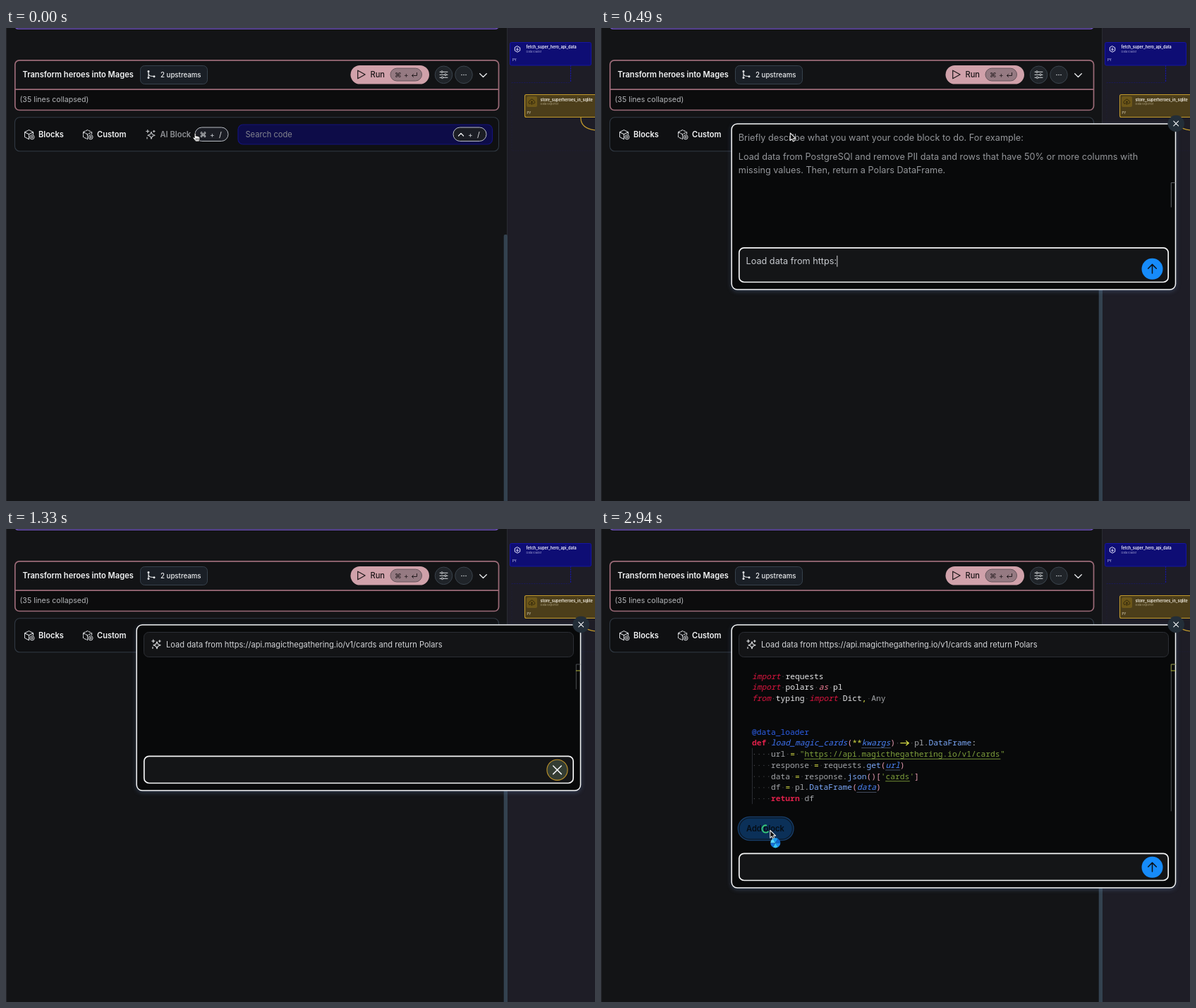
Write an HTML page with a canvas that moves like this. It is 835x671 px and loops after 3.01 s.

```html
<!DOCTYPE html>
<html lang="en">
<head>
<meta charset="utf-8">
<title>AI block</title>
<style>
html, body { margin: 0; width: 100%; height: 100%; overflow: hidden; background: #131416; }
canvas { display: block; }
</style>
</head>
<body>
<canvas id="stage" width="835" height="671"></canvas>
<script>
const ctx = document.getElementById('stage').getContext('2d');
const LOOP = 3010, STEP = 70;
const SANS = 'Inter, "Open Sans", sans-serif';
const SYMBOL = '"DejaVu Sans", sans-serif';
const MONO = '"Noto Sans Mono", "DejaVu Sans Mono", monospace';
const PROMPT = 'Load data from https://api.magicthegathering.io/v1/cards and return Polars';

// Braces mark a styled token; the first letter selects the style.
const CODE = [
  '{kimport} {wrequests}',
  '{kimport} {wpolars} {aas} {wpl}',
  '{kfrom} {wtyping} {kimport} {wDict}{o,} Any',
  '',
  '',
  '{d@data_loader}',
  '{bdef} {fload_magic_cards}{p(}{o**}{ukwargs}{p)} {o->} pl.{cDataFrame}{w:}',
  '    url {o=} {q"}{shttps://api.magicthegathering.io/v1/cards}{q"}',
  '    response {o=} requests.{cget}{p(}{uurl}{p)}',
  '    data {o=} response.{cjson}{p()[}{q\'}{scards}{q\'}{p]}',
  '    df {o=} pl.{cDataFrame}{p(}{udata}{p)}',
  '    {breturn} df'
];
const STYLE = {
  k: ['italic ', '#d8153f'], b: ['bold ', '#e0204a'], a: ['italic ', '#ee7d95'],
  w: ['', '#e6e6e8'], f: ['italic ', '#3f74f5'], u: ['italic ', '#4a82f5'],
  d: ['', '#2c5ee8'], c: ['', '#7ba7f7'], p: ['', '#e59bb0'],
  o: ['', '#d5dc45'], q: ['', '#7fa03c'], s: ['', '#7fa03c'], x: ['', '#a3a5a9']
};
const CHARS = CODE.join('').replace(/\{\w|\}/g, '').length;

const clamp = v => Math.max(0, Math.min(1, v));

function text(s, x, cy, size, color, weight = 400, family = SANS) {
  ctx.font = `${weight} ${size}px ${family}`;
  ctx.fillStyle = color;
  ctx.fillText(s, x, cy + size * 0.364);
}

function paint(fill, stroke, width) {
  if (fill) { ctx.fillStyle = fill; ctx.fill(); }
  if (stroke) { ctx.strokeStyle = stroke; ctx.lineWidth = width; ctx.stroke(); }
}

function box(x, y, x2, y2, r, fill, stroke, width = 1) {
  ctx.beginPath();
  ctx.roundRect(x, y, x2 - x, y2 - y, r);
  paint(fill, stroke, width);
}

function disc(x, y, r, fill, stroke, width = 1) {
  ctx.beginPath();
  ctx.arc(x, y, r, 0, Math.PI * 2);
  paint(fill, stroke, width);
}

function path(d, x, y, stroke, width = 1, fill) {
  ctx.save();
  ctx.translate(x, y);
  ctx.lineJoin = ctx.lineCap = 'round';
  const p = new Path2D(d);
  if (fill) { ctx.fillStyle = fill; ctx.fill(p); }
  if (stroke) { ctx.strokeStyle = stroke; ctx.lineWidth = width; ctx.stroke(p); }
  ctx.restore();
}

function cross(x, y, r, width) {
  path(`M${-r} ${-r}L${r} ${r}M${r} ${-r}L${-r} ${r}`, x, y, '#f2f4f6', width);
}

function sparkle(x, y, color) {
  path('M1 -3.6L2.3 -.3 6 1.3 2.3 2.8 1 6.2 -.4 2.8 -4 1.3 -.4 -.3Z' +
       'M-4.2 -6.5V-2.5M-6.2 -4.5H-2.2M4.8 -5.8V-3.2M3.5 -4.5H6.1M-5 4V6', x, y, color, 1.15);
}

function cube(x, y, dashed) {
  ctx.setLineDash(dashed ? [3, 1.4] : []);
  path('M-6.5 -3.3L-.5 -6.4 5.6 -3.3V0M-6.5 -3.3V3.6L-.5 6.7M-6.5 -3.3L-.5 -.2 5.6 -3.3M-.5 -.2V6.7', x, y, '#d6d8db', 1.05);
  ctx.setLineDash([]);
  disc(x + 4, y + 3.8, 3.1, '#101113', '#d6d8db', 1);
  path('M-1.5 0H1.5M0 -1.5V1.5', x + 4, y + 3.8, '#d6d8db', 0.9);
}

function keycap(x, glyph) {
  box(x, 141, x + 47, 160.5, 9.7, '#1b1d24', '#b9bdc4', 1);
  if (glyph) text(glyph, x + 6.5, 151, 10, '#e8eaec', 400, SYMBOL);
  else path('M-3.5 2L0 -1.6 3.5 2', x + 11, 151, '#f0f1f3', 1.3);
  text('+', x + 21, 151, 10, '#cfd2d6');
  text('/', x + 34, 151, 10.5, '#e8eaec');
}

function graph() {
  ctx.fillStyle = '#1e1d26';
  ctx.fillRect(711, 0, 124, 671);
  ctx.fillStyle = '#2a2b32';
  ctx.fillRect(710, 0, 1, 671);
  ctx.setLineDash([1.5, 2]);
  path('M717 77.5H800', 0, 0, '#18186a', 0.7);
  path('M717 77.5V174H835', 0, 0, '#20203a', 0.6);
  path('M800.5 53V77', 0, 0, '#1717a8', 1.2);
  ctx.setLineDash([]);

  box(714.5, 20.5, 829.5, 53, 2, '#0e0d74', '#1514a2', 1);
  path('M0 -4.2L3.7 -2.1V2.1L0 4.2 -3.7 2.1V-2.1ZM0 -1.8V1.5M-1.5 .2L0 1.7 1.5 .2', 725, 30, '#e8e8ff', 1);
  text('fetch_super_hero_api_data', 737.5, 27.3, 5.5, '#f2f2ff', 600);
  text('Data loader', 737.5, 33.6, 4, '#9a9ad0');
  text('PY', 718, 45, 4.2, '#c8c8f0', 500);

  path('M815 126C814 138 823 143.5 836 145', 0, 0, '#c29a2c', 1.2);
  box(735.5, 94.5, 845, 126.5, 2, '#4c3e1a', '#c29a2c', 1.1);
  box(738, 97, 753, 112, 2, '#6d5719');
  path('M-1.5 2.8H-3.8C-5.4 .8 -4 -1.4 -2.6 -1.4C-1.6 -4.4 2.2 -3.6 2.4 -1.4C4.8 -1.2 4.6 2.6 2.8 2.8H1.5M0 4V-.4M-1.5 1L0 -.6 1.5 1', 745.5, 104.5, '#2a210b', 0.9);
  text('store_superheroes_in_sqlite', 757.5, 101.8, 5.5, '#f4efe2', 600);
  text('Data exporter', 757.5, 108, 4, '#a89c78');
  text('PY', 738.5, 120, 4.2, '#d8cfb4', 500);
}

function block() {
  box(12.5, -20, 698.5, 1.3, 5, null, '#6d52b8', 1.6);
  box(12.8, 45.8, 698.5, 116.5, 6, '#0c0c0d', null);
  box(12.8, 45.8, 698.5, 87, [6, 6, 0, 0], '#121315', null);
  path('M13 87.2H698', 0, 0, '#9c6b78', 1.7);
  box(12.8, 45.8, 698.5, 116.5, 6, null, '#9c6b78', 1.7);
  text('Transform heroes into Mages', 23.5, 66, 11.1, '#f4f5f6', 600);
  text('(35 lines collapsed)', 19.5, 101.5, 10.6, '#b4b6b9');

  box(190.5, 53.5, 285.5, 79.5, 6, '#1a1f26', '#36414c', 1);
  path('M-4 -3V3M-4 -1C-4 3 0 3 3 3', 206, 65.5, '#e4e6e8', 1.2);
  for (const [x, y] of [[202, 61.5], [202, 70.5], [210, 68.7]]) disc(x, y, 1.5, '#e4e6e8');
  text('2 upstreams', 219, 66, 9.7, '#eceef0', 500);

  box(488.5, 53, 600, 79.5, 13.2, '#d0a1aa');
  path('M-4.8 -5.8L5.6 0 -4.8 5.8Z', 503.5, 66, '#1d1719', 1.2);
  text('Run', 516.5, 66, 11.1, '#1a1416', 500);
  box(545, 57.2, 589.5, 75, 9, '#957a82', '#66545b', 1);
  text('⌘', 551, 66.5, 9.5, '#231b1e', 400, SYMBOL);
  text('+', 564, 66, 10, '#231b1e');
  path('M3.5 -2.8V1.2H-3.5M-1.5 -.8L-3.5 1.2 -1.5 3.2', 579, 66.3, '#231b1e', 1);

  for (const x of [620.5, 649]) disc(x, 66.3, 12.3, '#202429', '#3a434c', 1);
  path('M-5.5 -4H5.5M-5.5 0H5.5M-5.5 4H5.5', 620.5, 66.3, '#d8dadc', 1);
  for (const [x, y] of [[618, 62.3], [623, 66.3], [618.5, 70.3]]) disc(x, y, 1.3, '#202429', '#e4e6e8', 0.9);
  for (const x of [646, 649, 652]) disc(x, 66.5, 0.75, '#e4e6e8');
  path('M-4.8 -2.3L0 2.5 4.8 -2.3', 676.5, 67, '#eceef0', 1.3);
}

function toolbar() {
  box(12.5, 126.8, 698.5, 174.8, 7, '#0f1012', '#303943', 1.1);
  cube(33, 151, false);
  text('Blocks', 46, 151.3, 11.1, '#f2f3f4', 600);
  cube(116, 151, true);
  text('Custom', 129, 151.3, 11.1, '#f2f3f4', 600);
  sparkle(205, 151, '#c4c6c9');
  text('AI Block', 218.5, 151.3, 11.1, '#8d8f93', 600);
  keycap(268, '⌘');
  box(329, 137, 689.5, 165, 7, '#0d0c48', '#14137a', 1.2);
  text('Search code', 339.5, 151.3, 11.1, '#85868f');
  keycap(634, null);
}

function hand(x, y) {
  path('M2.1 6.6V1.2C2.1 -.3 4.2 -.3 4.2 1.2V4.3C4.8 3.7 6 3.9 6.1 4.7C6.8 4.2 7.9 4.5 8 5.3C8.9 5 9.7 5.5 9.7 6.4V8.4C9.7 10 9 10.4 8.8 12H3.6C3.2 10.2 1.2 9 .2 7.3C-.5 6 1.1 5.4 2.1 6.6Z',
    x, y, '#111', 0.9, '#fff');
  path('M4.3 7.6V10M6 7.6V10M7.7 7.6V10', x, y, '#111', 0.7);
}

function arrow(x, y) {
  path('M0 0V10.6L2.5 8.4 4.1 12 6 11.1 4.5 7.6H7.8Z', x, y, '#e6e6e6', 1.1, '#0a0a0a');
}

function waitDisc(x, y, angle) {
  const hues = ['#1d8cf0', '#35c3f5', '#1470d8', '#5ad6fa', '#1b9df2', '#0f62c8'];
  hues.forEach((c, i) => {
    const a = angle + i * Math.PI / 3;
    ctx.beginPath();
    ctx.moveTo(x, y);
    ctx.arc(x, y, 7, a, a + Math.PI / 3 + 0.02);
    paint(c);
  });
}

function code(shown) {
  const x0 = 214, pitch = 6.77, size = pitch / 0.6;
  let left = shown;
  CODE.forEach((line, row) => {
    const y = 208.6 + row * 15.76;
    let x = x0;
    for (const m of line.matchAll(/\{(\w)([^}]*)\}|[^{]+/g)) {
      if (left <= 0) return;
      const key = m[1] || 'x', s = (m[2] || m[0]).slice(0, left);
      const [face, color] = STYLE[key], w = s.length * pitch;
      left -= s.length;
      if (s === '->') {
        path('M1 0H12.4M8.8 -3L12.4 0 8.8 3', x, y + 0.5, color, 1.3);
      } else {
        text(s, x, y, size, color, face, MONO);
        [...s].forEach((ch, i) => {
          if (ch === ' ') disc(x + (i + 0.5) * pitch, y + 0.6, 0.65, '#515459');
        });
      }
      if (key === 's' || key === 'u') {
        ctx.setLineDash(key === 'u' ? [1, 1] : []);
        path(`M0 0H${w}`, x, y + 7.3, key === 'u' ? '#56627a' : color, 0.9);
        ctx.setLineDash([]);
      }
      x += w;
    }
    if (row > 6) path(`M214.5 ${y - 7.8}V${y + 7.8}`, 0, 0, '#33363b', 0.8);
  });
}

function addButton(t) {
  const busy = t >= 2380;
  const press = t >= 2100 && !busy ? 1 : 0;
  box(194.3 + press, 408.3 + press, 273 - press, 441.7 - press, 17, '#0a1a2c', busy ? '#173f6c' : '#1b4a80', 1.3);
  box(196.5, 410.5, 270.8, 439.5, 14.5, busy ? '#0b3058' : '#103a63');
  text('Add block', 206, 425.3, 11.1, '#050c14', 600);
  if (busy) {
    const a = (t - 2940) / 700 * Math.PI * 2 + 0.7;
    ctx.beginPath();
    ctx.arc(233.6, 425.5, 5.2, a, a + 4.3);
    paint(null, '#36c878', 1.8);
  }
}

function popup(t) {
  const ease = 1 - (1 - clamp(t / 440)) ** 2;
  const sent = t >= 1120;
  const stream = clamp((t - 1330) / 280), done = t >= 1610;
  const rows = Math.ceil(stream * 12);
  const bottom = done ? 509.5 : 371.5 + Math.max(0, rows - 7) * 15.76;
  const typed = sent ? '' : PROMPT.slice(0, Math.round(PROMPT.length * clamp((t - 380) / 390)));

  ctx.save();
  ctx.globalAlpha = clamp(ease * 1.08);
  const k = 0.9 + 0.1 * ease;
  ctx.translate(500, 254);
  ctx.scale(k, k);
  ctx.translate(-500, -254);

  ctx.save();
  ctx.shadowColor = 'rgba(90,120,165,.45)';
  ctx.shadowBlur = 7;
  ctx.shadowOffsetY = 2;
  box(185.2, 136, 814.5, bottom - 0.5, 8, '#08090a');
  ctx.restore();
  box(185.2, 136, 814.5, bottom - 0.5, 8, null, '#f4f5f6', 1.5);

  if (sent) {
    box(195.5, 146.5, 804.5, 181.5, 7, '#131416', '#2c2f35', 1);
    sparkle(213, 163.5, '#e8eaec');
    text(PROMPT, 227, 163.8, 11.1, '#d4d6d9');
    code(Math.round(CHARS * stream));
    const end = done ? 400 : 227 + Math.max(0, rows - 2) * 14;
    path(`M814 192H808.3V${end}`, 0, 0, '#55585d', 0.9);
    path('M808.3 201H814', 0, 0, '#b5b93a', 1);
    if (done) path('M808.3 201V192H814', 0, 0, '#8b8f35', 0.9);
  } else {
    const hint = '#94969a';
    text('Briefly describe what you want your code block to do. For example:', 194.8, 155.2, 12.7, hint);
    text('Load data from PostgreSQl and remove PII data and rows that have 50% or more columns with', 194.8, 182.8, 12.7, hint);
    text('missing values. Then, return a Polars DataFrame.', 194.8, 200.9, 12.7, hint);
    path('M814 219.5H808.3V254', 0, 0, '#6c6f74', 0.9);
  }

  if (done) addButton(t);

  const top = typed ? 311.8 : bottom - 49.2;
  box(195.8, top, 804.2, bottom - 11, 7, '#141517', '#f4f5f6', 1.7);
  if (!sent) {
    const cy = typed ? 330.8 : 341;
    text(typed, 205.5, cy, 12.7, '#c6c9ce');
    const cx = 206.2 + ctx.measureText(typed).width;
    path(`M${cx} ${cy - 7.5}V${cy + 7.5}`, 0, 0, '#d8dadc', 1);
  }
  const by = bottom - 29.7;
  if (sent && !done) {
    disc(781.5, by, 14.6, '#343d33', '#c0942a', 1.1);
    cross(781.5, by, 5.8, 1.5);
  } else {
    disc(781.5, by, 15, '#168bfa');
    path('M0 6.3V-6.3M-5.8 -.6L0 -6.4 5.8 -.6', 781.5, by, '#0b1016', 1.5);
  }

  disc(815.2, 135.5, 11.8, '#232e38');
  cross(815.2, 135.5, 3.4, 1.1);
  ctx.restore();
}

function pointer(t) {
  if (t < 70) hand(265, 149);
  else if (t < 1120) arrow(268.3, 149);
  else if (t >= 2380) {
    arrow(239.8, 427.5);
    waitDisc(247.3, 445.3, (t - 2940) / 800 * Math.PI * 2);
  } else if (t >= 1750) hand(237, 429.5);
  else if (t >= 1680) arrow(250, 452);
}

function draw(now) {
  const t = Math.floor((now % LOOP) / STEP) * STEP;
  ctx.fillStyle = '#131416';
  ctx.fillRect(0, 0, 835, 671);
  ctx.fillStyle = '#26272b';
  ctx.fillRect(0, 0, 1, 671);
  graph();
  box(705.7, 293, 711, 680, [2, 2, 0, 0], '#33424f');
  block();
  toolbar();
  if (t >= 70) popup(t);
  pointer(t);
}

let start;
function tick(now) {
  start ??= now;
  draw(now - start);
  requestAnimationFrame(tick);
}
requestAnimationFrame(tick);
</script>
</body>
</html>
```
